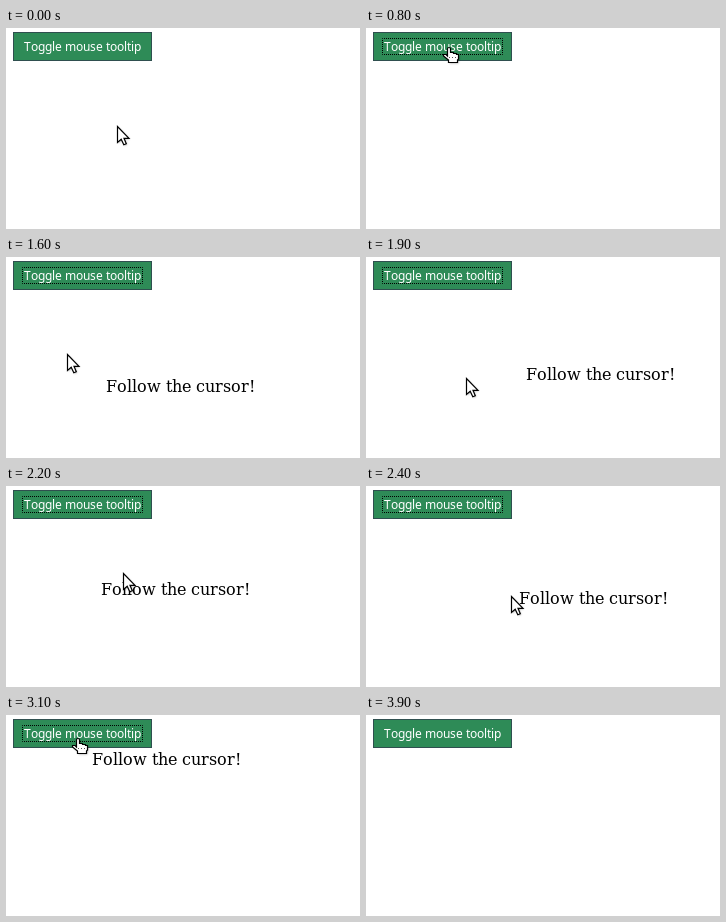
Write an HTML page with a canvas that moves like this. It is 354x201 px and loops after 4.4 s.

```html
<!DOCTYPE html>
<html lang="en">
<head>
<meta charset="utf-8">
<title>Mouse tooltip</title>
<style>
  html, body { margin: 0; width: 100%; height: 100%; overflow: hidden; background: #fff; }
  canvas { display: block; }
</style>
</head>
<body>
<canvas width="354" height="201"></canvas>
<script>
const ctx = document.querySelector('canvas').getContext('2d');
const LOOP = 4400, STEP = 100;
const FOCUS = [8, 39], TOOLTIP = [9, 33], ORBIT = [14, 26], EXIT = 36;

// Key points as [step, values...]
const stops = [[0, 111, 98], [6, 82, 24], [8, 82, 24], [13, 145, 70], [27, 61, 93], [30, 71, 28], [35, 71, 28], [EXIT, 192, 0]];
const turns = [[14, 50], [16, 180], [20, 545], [22, 650], [26, 799]];

const arrow = new Path2D('M.5.5V16.5L4.2 13.2L6.8 18.8L9.3 17.7L7 12.3H12Z');
const hand = new Path2D('M4.5 9V2Q4.5.5 6 .5T7.5 2V5.5H10.5V6.5H13.5V7.5H15.5V12L14.5 13V15.5H5.5V13L.5 9V7.5H3Z');

const linear = u => u;
const smooth = u => u * u * (3 - 2 * u);
const within = (step, [from, to]) => step >= from && step < to;

function track(keys, step, ease) {
  const next = Math.max(1, keys.findIndex(key => key[0] >= step));
  const [t0, ...from] = keys[next - 1], [t1, ...to] = keys[next];
  const u = ease((step - t0) / (t1 - t0));
  return from.map((value, i) => value + (to[i] - value) * u);
}

// Rings around a slowly sinking centre
function orbit(step) {
  const angle = track(turns, step, linear)[0] * Math.PI / 180;
  const centreY = 95.3 + 1.45 * (step - 15);
  return [103 + 42 * Math.cos(angle), centreY + 20 * Math.sin(angle)];
}

function pointerAt(step) {
  const circling = step >= ORBIT[0] && step <= ORBIT[1];
  return (circling ? orbit(step) : track(stops, step, smooth)).map(Math.round);
}

// Letters sit on whole pixels
function drawText(text, x, y, font, color) {
  ctx.font = font;
  ctx.fillStyle = color;
  for (const letter of text) {
    ctx.fillText(letter, x, y);
    x += Math.round(ctx.measureText(letter).width);
  }
}

function drawButton(focused) {
  ctx.fillStyle = '#2e8b57';
  ctx.fillRect(7, 4, 139, 29);
  ctx.strokeStyle = '#2f4f4f';
  ctx.strokeRect(7.5, 4.5, 138, 28);
  if (focused) {
    ctx.strokeStyle = '#000';
    ctx.setLineDash([1, 1]);
    ctx.lineDashOffset = 0.5;
    ctx.strokeRect(16.5, 10.5, 120, 16);
    ctx.setLineDash([]);
  }
  drawText('Toggle mouse tooltip', 18, 23, '12px "Noto Sans", "Open Sans", sans-serif', '#fff');
}

function drawPointer([x, y]) {
  const overButton = x > 7 && x < 146 && y > 4 && y < 33;
  const shape = overButton ? hand : arrow;
  const offset = overButton ? 5 : 0;
  ctx.save();
  ctx.translate(x - offset, y - offset);
  ctx.save();
  ctx.shadowColor = 'rgba(0,0,0,.3)';
  ctx.shadowBlur = 2;
  ctx.shadowOffsetX = ctx.shadowOffsetY = 1;
  ctx.fillStyle = '#fff';
  ctx.fill(shape);
  ctx.restore();
  ctx.strokeStyle = '#000';
  ctx.lineWidth = 1.2;
  ctx.stroke(shape);
  if (overButton) {
    ctx.fillStyle = '#555';
    for (let dot = 6; dot <= 12; dot += 3) ctx.fillRect(dot, 10, 1, 1);
  }
  ctx.restore();
}

function draw(now) {
  const step = Math.floor(now % LOOP / STEP);
  ctx.fillStyle = '#fff';
  ctx.fillRect(0, 0, 354, 201);
  drawButton(within(step, FOCUS));
  if (within(step, TOOLTIP)) {
    // The tooltip trails the pointer by one step
    const [x, y] = pointerAt(step - 1);
    drawText('Follow the cursor!', x + 15, y + 22, '16px "DejaVu Serif", serif', '#000');
  }
  if (step <= EXIT) drawPointer(pointerAt(step));
}

const start = performance.now();
function tick() {
  draw(performance.now() - start);
  requestAnimationFrame(tick);
}
tick();
</script>
</body>
</html>
```
